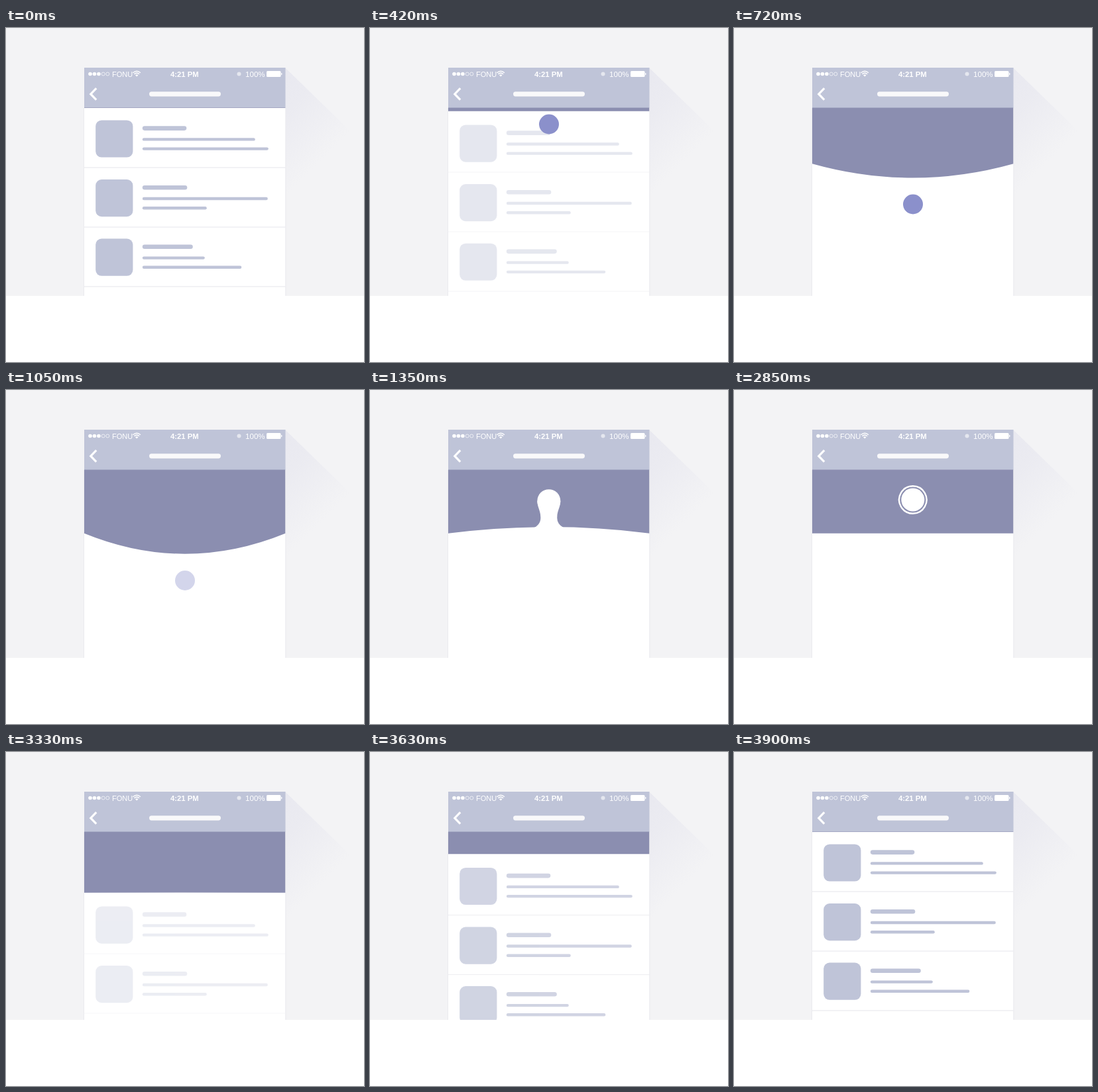
Recreate the animation shown at these times as an HTML page. Size 540x505 px, loop 5520 ms.

```html
<!DOCTYPE html>
<html lang="en">
<head>
<meta charset="utf-8">
<title>Pull to refresh</title>
<style>
html, body { margin: 0; width: 100%; height: 100%; overflow: hidden; background: #fff; }
svg { display: block; width: 100vw; height: 100vh; }
text { font-family: "Liberation Sans", Arial, sans-serif; fill: #fff; }
</style>
</head>
<body>
<svg viewBox="0 0 540 505">
  <defs>
    <linearGradient id="fade" gradientUnits="userSpaceOnUse" x1="422" y1="62" x2="518" y2="158">
      <stop offset="0" stop-color="#e9e9f0"/>
      <stop offset=".35" stop-color="#ebebf1"/>
      <stop offset="1" stop-color="#f3f3f5"/>
    </linearGradient>
    <clipPath id="screen"><rect x="118" y="120" width="303.5" height="285"/></clipPath>
  </defs>
  <rect width="540" height="405" fill="#f3f3f5"/>
  <path d="M421 60L540 176V405H421Z" fill="url(#fade)"/>
  <rect x="117" y="121" width="305.5" height="284" fill="#ebebef"/>
  <g clip-path="url(#screen)">
    <rect x="118" y="120" width="303.5" height="285" fill="#fff"/>
    <g id="list"></g>
    <path id="pool" fill="#8b8eb0"/>
    <path id="neck" fill="#fff"/>
    <circle id="ball" cx="269.8" r="17.5" fill="#fff"/>
    <path id="ring" fill="none" stroke="#fff"/>
    <circle id="touch" cx="270" r="15" fill="#8b90cb"/>
  </g>
  <rect x="118" y="60" width="303.5" height="60.5" fill="#bfc4d8"/>
  <g fill="#fff">
    <circle cx="127" cy="69.5" r="2.8"/>
    <circle cx="133.4" cy="69.5" r="2.8"/>
    <circle cx="139.9" cy="69.5" r="2.8"/>
    <g fill="none" stroke="#fff" stroke-width=".7">
      <circle cx="146.7" cy="69.5" r="2.5"/>
      <circle cx="153.3" cy="69.5" r="2.5"/>
    </g>
    <text x="160" y="73.6" font-size="11">FONU</text>
    <path d="M197.2 73.6L195 71.2Q197.2 69.4 199.4 71.2Z"/>
    <g fill="none" stroke="#fff" stroke-width="1.4">
      <path d="M193.3 69.7Q197.2 66.2 201.1 69.7"/>
      <path d="M191.5 67.7Q197.2 62.8 202.9 67.7"/>
    </g>
    <text x="269.3" y="73.6" font-size="11.3" font-weight="bold" text-anchor="middle">4:21 PM</text>
    <circle cx="351.5" cy="69.5" r="3" opacity=".6"/>
    <text x="361" y="73.7" font-size="11.6">100%</text>
    <rect x="393" y="65" width="21.5" height="9" rx="1.6"/>
    <rect x="415" y="68" width="1.4" height="3" rx=".7"/>
    <rect x="216" y="96.2" width="108" height="7.2" rx="3.6" fill="#f9f9fa"/>
    <path d="M136.2 91.2L127.8 99.9L136.2 108.6" fill="none" stroke="#fff" stroke-width="3.2"/>
  </g>
</svg>
<script>
const LOOP = 5520, CX = 269.8, BALL_Y = 166, R = 17.5;
const $ = id => document.getElementById(id);
const set = (id, attrs) => {
  for (const key in attrs) $(id).setAttribute(key, attrs[key]);
};
const ramp = (t, from, to) => Math.min(1, Math.max(0, (t - from) / (to - from)));
const cubic = u => u < .5 ? 4 * u ** 3 : 1 - 4 * (1 - u) ** 3;
const smooth = u => u * u * (3 - 2 * u);
const spring = (s, size, decay, period) =>
  s < 0 ? 0 : size * Math.exp(-decay * s) * Math.cos(2 * Math.PI * s / period);

const bar = (x, y, w, h, r, fill = "#bfc4d8") =>
  `<rect x="${x}" y="${y}" width="${w}" height="${h}" rx="${r}" fill="${fill}"/>`;
$("list").innerHTML = [[66.5, 170, 190], [67.5, 189, 97], [76, 94, 149.5]].map(([a, b, c], i) => {
  const y = i * 89.6;
  return bar(135.2, y + 139.4, 56.2, 56.2, 9) +
    bar(205.8, y + 148.3, a, 6.6, 3.3) +
    bar(205.8, y + 166.2, b, 4.4, 2.2) +
    bar(205.8, y + 180.4, c, 4.4, 2.2) +
    bar(118, 210.4 + i * 90, 304, 1.2, 0, "#e9e9ee");
}).join("");

function neckPath(t, y, foot) {
  const waist = R * (1 - ramp(t, 1180, 1440) ** 3);
  if (t < 1170 || t > 1530 || y > foot - 4) return "";
  if (waist < .5) {
    const h = 14 * (1 - ramp(t, 1440, 1530));
    return `M${CX - 18} ${foot + 1}Q${CX} ${foot} ${CX} ${foot - h}Q${CX} ${foot} ${CX + 18} ${foot + 1}Z`;
  }
  const wy = Math.min(y + 24, foot - 1);
  return `M${CX - 22} ${foot + 1}Q${CX - waist + 1} ${foot - 5} ${CX - waist} ${wy}` +
    `C${CX - waist} ${wy - 9} ${CX - R} ${y + 9} ${CX - R} ${y}` +
    `H${CX + R}C${CX + R} ${y + 9} ${CX + waist} ${wy - 9} ${CX + waist} ${wy}` +
    `Q${CX + waist - 1} ${foot - 5} ${CX + 22} ${foot + 1}Z`;
}

function ringPath(turn, r) {
  const a = Math.PI * (.5 + 2 * Math.min(turn, .9999));
  return `M${CX} ${BALL_Y + r}A${r} ${r} 0 ${turn > .5 ? 1 : 0} 1 ` +
    `${CX + r * Math.cos(a)} ${BALL_Y + r * Math.sin(a)}`;
}

function draw(t) {
  const pull = cubic(ramp(t, 238, 937));
  const open = pull * (1 - smooth(ramp(t, 3254, 3890)));
  const shift = 98 * open;
  const edge = Math.max(121, 118.7 + shift);

  // The surface sags under the pull, then swings back when let go.
  const bow = t < 1120 ? 31 * pull ** 3
    : t < 2200 ? spring(t - 1120, 31, .004, 380)
    : spring(t - 3110, 8, .015, 150) * ramp(t, 3110, 3140);
  set("pool", { d: `M118 119H421.5V${edge}Q269.75 ${edge + 2 * bow} 118 ${edge}Z` });

  set("list", {
    transform: `translate(0 ${shift})`,
    opacity: t < 2000 ? 1 - ramp(t, 90, 640) : ramp(t, 3116, 3830)
  });

  const rise = 1 - (1 - ramp(t, 1170, 1380)) ** 2;
  const drop = ramp(t, 2940, 3150) ** 2;
  const y = 256 - 90 * rise + 90 * drop;
  set("ball", { cy: y, opacity: t > 1170 && t < 3150 ? 1 : 0 });
  set("neck", { d: neckPath(t, y, edge + bow) });

  const turn = ramp(t, 1380, 2340), burst = ramp(t, 2850, 3030);
  set("ring", {
    d: ringPath(turn, 20.7 + 4 * burst),
    opacity: turn > 0 ? 1 - burst : 0,
    "stroke-width": 2.4 * (1 - .5 * burst)
  });

  set("touch", {
    cy: 140 + 148 * pull ** 1.25,
    opacity: ramp(t, 60, 240) * (1 - ramp(t, 930, 1125))
  });
}

const start = performance.now();
function tick() {
  draw((performance.now() - start) % LOOP);
  requestAnimationFrame(tick);
}
tick();
</script>
</body>
</html>
```
